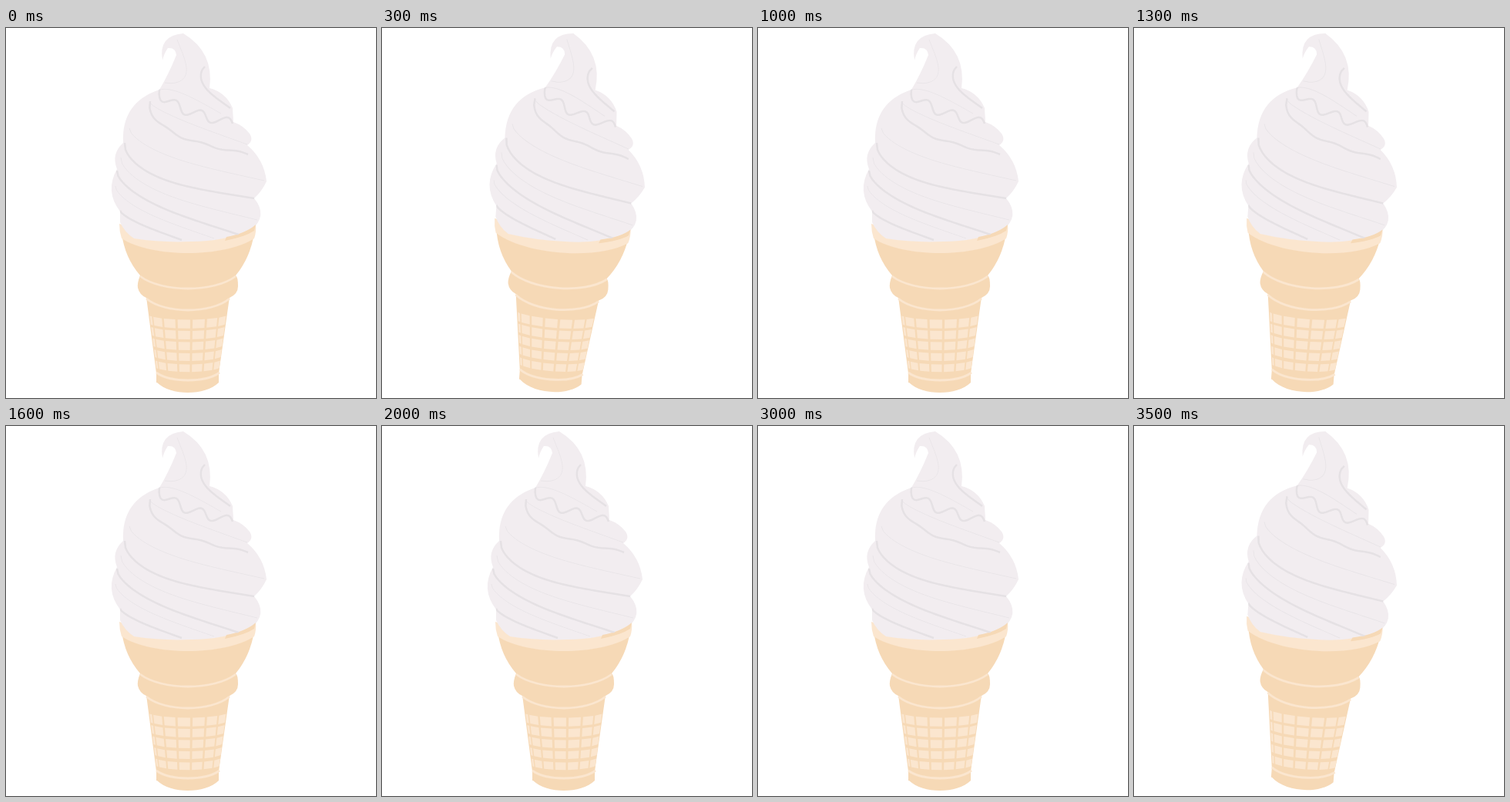
An HTML page with a canvas for the animation above (3.6 s loop, 480 by 480 pixels).

```html
<!DOCTYPE html>
<html lang="en">
<head>
<meta charset="utf-8">
<title>Soft serve</title>
<style>
html, body { margin: 0; width: 100%; height: 100%; overflow: hidden; background: #fff; }
canvas { display: block; width: 480px; height: 480px; }
</style>
</head>
<body>
<canvas id="stage" width="480" height="480"></canvas>
<script>
const ctx = document.getElementById('stage').getContext('2d');
const CREAM = '#f2edf0', FOLD = '#e5e1e4', CREASE = '#e9e5e8';
const WAFER = '#f6d9b6', PALE = '#fbe6cf';
const MID = 236;
const rad = deg => deg * Math.PI / 180;

// Closed outline of lobes: each corner is reached by an arc that swells by `bulge`
function lobes(corners) {
  const path = new Path2D();
  let [x, y] = corners[corners.length - 1];
  path.moveTo(x, y);
  for (const [nx, ny, bulge] of corners) {
    const dx = nx - x, dy = ny - y;
    path.quadraticCurveTo(x + dx / 2 + bulge * dy, y + dy / 2 - bulge * dx, nx, ny);
    [x, y] = [nx, ny];
  }
  return path;
}

// Line that sags early on its way, with an optional ripple
function swirl([x0, y0, x1, y1, sag, ripple = 0]) {
  const path = new Path2D(), dx = x1 - x0, dy = y1 - y0;
  for (let t = 0; t <= 1.001; t += 0.025) {
    const s = Math.min(t, 1);
    const off = sag * Math.sin(Math.PI * s ** 0.6) + ripple * Math.sin(6 * Math.PI * s);
    path.lineTo(x0 + dx * s - dy * off, y0 + dy * s + dx * off);
  }
  return path;
}

const cream = lobes([
  [230, 7, 0.55], [264, 78, 0.33], [294, 104, 0.25], [295, 122, 0], [316, 137, 0.15],
  [313, 152, 0.5], [338, 199, 0.2], [322, 221, 0.1], [318, 262, 0.5], [240, 277, 0.1],
  [166, 273, 0.05], [148, 252, 0.15], [148, 238, 0], [144, 183, 0.33], [152, 149, 0.35],
  [199, 80, 0.38], [221, 35, -0.04], [210, 26, -0.5], [203, 42, -0.1]
]);

const folds = [
  [258, 50, 291, 104, 0.22],
  [199, 79, 294, 124, 0.1, 0.06],
  [187, 95, 314, 164, 0.15, 0.01],
  [154, 149, 322, 221, 0.13],
  [144, 185, 302, 268, 0.09],
  [148, 237, 228, 275, 0.05]
].map(swirl);

const creases = [
  [206, 71, 222, 15, 0.4],
  [199, 81, 279, 111, -0.08],
  [188, 98, 313, 151, 0.03],
  [160, 130, 335, 198, 0.08],
  [149, 168, 326, 249, 0.1],
  [142, 205, 270, 273, 0.08]
].map(swirl);

// Front edge of a ring on the cone, as path data from left to right
const ring = (half, y, depth) =>
  `M${MID - half} ${y}c${half * 0.45} ${depth * 4 / 3} ${half * 1.55} ${depth * 4 / 3} ${half * 2} 0`;

const trunk = new Path2D(ring(40, 460, 13) + 'V448L290 349H182L195 448V460Z');
const bowl = new Path2D(ring(62, 321, 18) + 'Q317 298 322 266H150Q154 298 174 321Z');
const collar = new Path2D(ring(54, 350, 16) + 'Q301 345 301 335Q301 323 298 321H174Q170 331 171 337Q173 346 182 350Z');
const rim = new Path2D(ring(86, 273, 19) + 'Q325 264 324 255Q236 285 147 254Q147 264 150 273Z');
const lip = new Path2D('M286 271Q312 266 324 255L322 263Q310 271 284 276Z');
const seams = [ring(62, 322, 16), ring(54, 351, 15), ring(41, 447, 10)].map(d => new Path2D(d));

// Waffle windows: equal angles around the trunk, narrowing towards the foot
function drawWaffle() {
  const point = (angle, y) => {
    const a = rad(Math.max(-66, Math.min(66, angle)));
    return [MID + 54 * Math.sin(a) * (1 - (y - 372) * 0.0026), y + 8.5 * Math.cos(a)];
  };
  ctx.fillStyle = PALE;
  for (let row = 0; row < 5; row++) {
    const top = 370 + 14.5 * row, bottom = top + 11.3 - 0.4 * row;
    for (let col = -4; col < 3; col++) {
      const left = 6.5 + 20.8 * col, right = left + 17.4;
      ctx.beginPath();
      ctx.moveTo(...point(left, top));
      ctx.lineTo(...point(right, top));
      ctx.lineTo(...point(right, bottom));
      ctx.lineTo(...point(left, bottom));
      ctx.fill();
    }
  }
}

const fill = (path, color) => {
  ctx.fillStyle = color;
  ctx.fill(path);
};
const stroke = (paths, color, width) => {
  ctx.strokeStyle = color;
  ctx.lineWidth = width;
  for (const path of paths) ctx.stroke(path);
};

function draw(angle) {
  ctx.resetTransform();
  ctx.clearRect(0, 0, 480, 480);
  ctx.translate(240, 240);
  ctx.rotate(angle);
  ctx.translate(-240, -240);

  for (const part of [trunk, collar, bowl]) fill(part, WAFER);
  drawWaffle();
  stroke(seams, PALE, 2.8);
  fill(rim, PALE);

  fill(cream, CREAM);
  fill(lip, WAFER);
  ctx.save();
  ctx.clip(cream);
  stroke(creases, CREASE, 1);
  stroke(folds, FOLD, 2.5);
  ctx.restore();
}

// The cone flips between upright and leaning every 100 ms
const LEAN = rad(4.5);
function tick() {
  draw(Math.floor(performance.now() / 100) % 2 ? LEAN : 0);
  requestAnimationFrame(tick);
}
tick();
</script>
</body>
</html>
```
